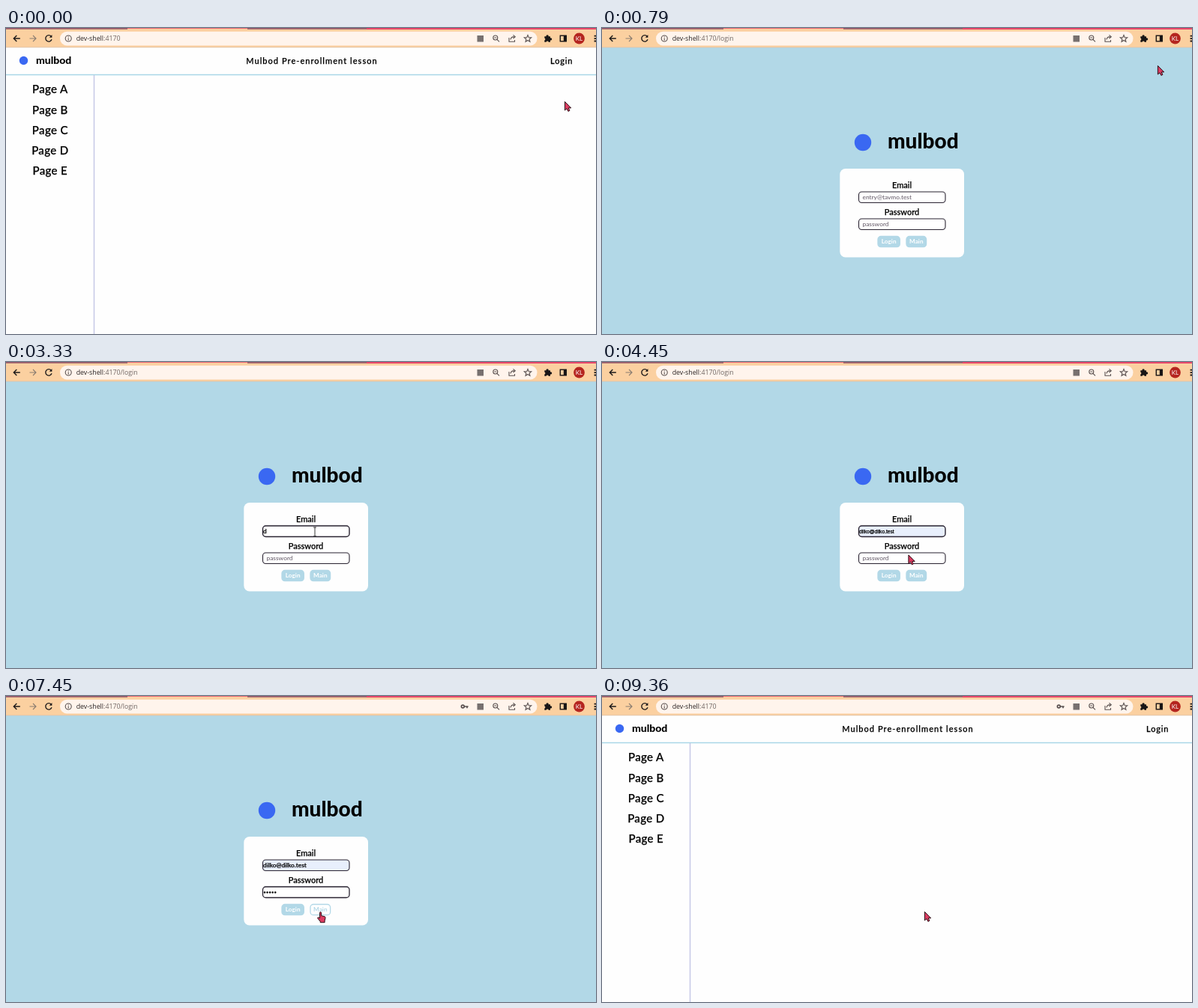
These frames come from a looping animation (787x409 px, 9.42 s). An HTML page:

```html
<!DOCTYPE html>
<html lang="en">
<head>
<meta charset="utf-8">
<title>Login flow</title>
<style>
  html, body { margin: 0; width: 100%; height: 100%; overflow: hidden; background: #fefefe; }
  svg { display: block; width: 100vw; height: 100vh; }
  text { font-family: Lato, "Open Sans", sans-serif; white-space: pre; }
  .medium { font-weight: 500; stroke: #000; stroke-width: .25; }
  .brand { font-weight: 800; }
  .mid { text-anchor: middle; }
  .url { font: 8.8px "Open Sans", "Noto Sans", sans-serif; }
  .icon { fill: none; stroke: #5a5150; stroke-width: 1.1; }
  .hint { font-size: 8.4px; fill: #5f5563; }
  .btn { font-size: 8.2px; font-weight: 700; }
</style>
</head>
<body>
<svg viewBox="0 0 787 409">
  <g id="home">
    <rect y="26" width="787" height="383" fill="#fefefe"/>
    <path d="M0 62.5H787" stroke="#a9d6e6" stroke-width="1.4"/>
    <path d="M117.5 63V409" stroke="#c3c6e6" stroke-width="1.4"/>
    <circle cx="23.5" cy="43.5" r="5.7" fill="#3a68f2"/>
    <text class="brand" x="40" y="47.5" font-size="14">mulbod</text>
    <text class="medium mid" x="408" y="48" font-size="11" letter-spacing="1.05">Mulbod Pre-enrollment lesson</text>
    <text class="medium" x="726" y="47.5" font-size="11" letter-spacing=".85">Login</text>
    <g id="menu"></g>
  </g>

  <g id="login">
    <rect y="26" width="787" height="383" fill="#b2d8e7"/>
    <circle cx="348" cy="153" r="11.2" fill="#3a68f2"/>
    <text class="brand" x="381" y="161" font-size="28">mulbod</text>
    <rect x="317.3" y="188" width="165.7" height="118.5" rx="7.5" fill="#fefefe"/>
    <text class="medium mid" x="400" y="214" font-size="11">Email</text>
    <text class="medium mid" x="400" y="250" font-size="11">Password</text>
    <rect id="mailBox" x="342.5" y="219" width="115.5" height="14.5" rx="4" stroke="#292331"/>
    <rect id="passBox" x="342.5" y="255" width="115.5" height="14.5" rx="4" fill="#fff" stroke="#292331"/>
    <text id="mailHint" class="hint" x="347.5" y="229">entry@tavmo.test</text>
    <text id="passHint" class="hint" x="347.5" y="265">password</text>
    <text id="mail" class="medium" x="343" y="229"></text>
    <g id="dots"></g>
    <g id="buttons"></g>
  </g>

  <g id="toolbar">
    <rect width="787" height="26" fill="#fbd0a0"/>
    <path d="M0 25.8H787" stroke="#dcc3ab" stroke-width=".8"/>
    <path d="M0 0H162V1.8H0ZM322 0H481V1.8H322Z" fill="#94596a"/>
    <path d="M162 0H322V.7H162ZM481 0H787V1.9H481Z" fill="#e6476a"/>
    <rect x="72" y="4.8" width="636.5" height="18.6" rx="9.3" fill="#fff4ec"/>
    <g fill="none" stroke="#1d1a1a" stroke-width="1.4">
      <path d="M18.8 14H10.5M14.3 10L10.3 14L14.3 18"/>
      <path d="M31.5 14H39.8M36 10L40 14L36 18" stroke="#8a7c70" stroke-width="1.1"/>
      <path d="M60.3 11.2A4.2 4.2 0 1 0 61 15.3"/>
      <path d="M61.4 9V12.7H57.7Z" fill="#1d1a1a" stroke="none"/>
    </g>
    <g class="icon">
      <circle cx="83.2" cy="14" r="4"/>
      <path d="M83.2 13.4V16.4M83.2 11.4V12.5"/>
      <circle cx="652.8" cy="13" r="3"/>
      <path d="M655 15.3L658 18.3M651.3 13H654.3"/>
      <path d="M671 13V18.3H678.5V16M673 15.5C673.5 12.6 675.5 11.6 678 11.6M676.5 9.3L679.3 11.7L676.5 14.1"/>
      <path d="M696 9.4L697.3 12.6 700.7 12.8 698.1 15 698.9 18.3 696 16.5 693.1 18.3 693.9 15 691.3 12.8 694.7 12.6Z"/>
    </g>
    <rect x="628.5" y="10" width="8.5" height="8.5" fill="#77706f"/>
    <g id="key" class="icon" stroke-width="1.6">
      <circle cx="609.3" cy="14" r="1.9" stroke-width="1.7"/>
      <path d="M611 14H616.6M615 14V16.3" stroke-width="1.7"/>
    </g>
    <path d="M718.3 11.3H720.6A1.6 1.6 0 1 1 723.6 11.3H726V13.4A1.6 1.6 0 1 1 726 16.4V18.7H723.7A1.6 1.6 0 0 0 720.6 18.7H718.3V16.4A1.6 1.6 0 0 0 718.3 13.4Z" fill="#181515"/>
    <rect x="739.3" y="10.2" width="8" height="7.6" fill="none" stroke="#181515" stroke-width="1.4"/>
    <rect x="743.8" y="10" width="3.6" height="8" fill="#181515"/>
    <circle cx="764.5" cy="14" r="7.4" fill="#b5251f"/>
    <text class="mid" x="764.5" y="17" font-size="8" fill="#fff">KL</text>
    <path d="M784.6 9.8H787V11.6H784.6ZM784.6 13.2H787V15H784.6ZM784.6 16.6H787V18.4H784.6Z" fill="#181515"/>
    <text class="url" x="93.7" y="17.1" fill="#2a2424">dev-shell<tspan id="path" fill="#6f6663"></tspan></text>
  </g>

  <g id="cursor" stroke-linejoin="round">
    <path id="arrow" d="M.4 .4V12L3 9.7 4.9 13.4 6.9 12.4 5.2 8.9H8.7Z" fill="#dc3c61" stroke="#2a1018"/>
    <path id="hand" d="M-1 1.2Q-1 .2 0 .2T1.1 1.2V5.2L5.6 6.3Q6.7 6.7 6.6 8L5.6 12.2V14.2H-.3V12.8L-3.6 8.8Q-4.2 7.6-3 7.3L-1 8.4Z" fill="#dc3c61" stroke="#2a1018"/>
    <path id="beam" d="M-2-6H2M0-6V6M-2 6H2" fill="none" stroke="#222" stroke-width=".9"/>
  </g>
</svg>

<script>
const LOOP = 9420;
const OPEN = 790, CLOSE = 9270;
const MAIL = 'dilko@dilko.test';
const KEYS = [3270, 3700, 3790];
const PREVIEW = 4330, PICK = 4520;
const DOTS = [5760, 5850, 5940, 6030, 6180];
const BLUE = '#b2d8e7';

// Pointer stops: time, x, y
const STOPS = [
  [0, 745, 98], [30, 745, 98], [120, 751, 123], [300, 741, 50], [1360, 741, 50],
  [1640, 450, 315], [1790, 421, 286], [1980, 421, 286], [2030, 420, 238],
  [2330, 420, 238], [2360, 434, 197], [2760, 434, 197], [3030, 412, 227],
  [4270, 412, 227], [4450, 408.5, 257.5], [4520, 408.5, 257.5], [4640, 407, 261],
  [4850, 407, 261], [5450, 402, 263], [6520, 402, 263], [7120, 384, 287],
  [7330, 384, 287], [7450, 419.5, 288.5], [7980, 419.5, 288.5], [8330, 384, 291],
  [8580, 384, 291], [8820, 411, 297], [9060, 434.5, 288], [9270, 434.5, 288],
  [9360, 430, 288]
];

const $ = id => document.getElementById(id);
const show = (el, on) => el.setAttribute('display', on ? 'inline' : 'none');
const set = (el, attrs) => { for (const k in attrs) el.setAttribute(k, attrs[k]); };

function add(parent, tag, attrs, text = '') {
  const el = document.createElementNS('http://www.w3.org/2000/svg', tag);
  set(el, attrs);
  el.textContent = text;
  parent.appendChild(el);
  return el;
}

[...'ABCDE'].forEach((c, i) => add($('menu'), 'text',
  { class: 'medium mid', x: 58.8, y: 87.3 + i * 27.25, 'font-size': 15, 'letter-spacing': .35 }, 'Page ' + c));

const dots = DOTS.map((_, i) => add($('dots'), 'circle', { cx: 345 + i * 3.55, cy: 262.6, r: 1.25 }));

function button(label, x, w) {
  const box = add($('buttons'), 'rect', { x, y: 278.5, width: w, height: 14.2, rx: 4, stroke: BLUE, 'stroke-width': 1.3 });
  const text = add($('buttons'), 'text', { class: 'btn mid', x: x + w / 2, y: 288.4 }, label);
  return {
    hit: (px, py) => px > x - 2.5 && px < x + w + 2.5 && py > 277 && py < 297.5,
    hover(on) {
      box.setAttribute('fill', on ? '#fff' : BLUE);
      text.setAttribute('fill', on ? BLUE : '#fff');
    }
  };
}
const buttons = [button('Login', 368, 29.3), button('Main', 406, 26.6)];

function pointer(t) {
  const i = STOPS.findIndex(s => s[0] > t);
  if (i < 0) return STOPS[STOPS.length - 1].slice(1);
  const [t0, x0, y0] = STOPS[i - 1], [t1, x1, y1] = STOPS[i];
  const u = (t - t0) / (t1 - t0), e = u * u * (3 - 2 * u);
  return [x0 + (x1 - x0) * e, y0 + (y1 - y0) * e];
}

function drawForm(t) {
  const typed = KEYS.filter(k => t >= k).length;
  const filled = t >= PREVIEW;
  $('mail').textContent = filled ? MAIL : MAIL.slice(0, typed);
  const preview = filled && t < PICK;
  $('mail').style.fontFamily = preview ? '"Liberation Sans", Arial, sans-serif' : '';
  set($('mail'), { 'font-size': preview ? 6.67 : 8.3 });
  show($('mailHint'), !typed);
  show($('passHint'), t < DOTS[0]);
  dots.forEach((d, i) => show(d, t >= DOTS[i]));
  set($('mailBox'), {
    fill: filled ? '#e8effc' : '#fff',
    'stroke-width': t >= 3210 && t < 4850 ? 1.4 : 1.1
  });
  set($('passBox'), { 'stroke-width': t >= 5300 ? 1.3 : 1.1 });
}

function drawCursor(t, inForm) {
  const [x, y] = pointer(t);
  let over = !inForm && x > 724 && y > 36 && y < 53;
  buttons.forEach(b => {
    const on = inForm && b.hit(x, y);
    b.hover(on);
    over = over || on;
  });
  const inField = inForm && x > 342 && x < 458 && (y > 219 && y < 234 || y > 255 && y < 270);
  const listOpen = t >= 4270 && t < 4640;
  const beam = inField && !listOpen;
  show($('hand'), over);
  show($('beam'), beam);
  show($('arrow'), !over && !beam);
  set($('cursor'), { transform: `translate(${x} ${y})` });
}

function draw(t) {
  const inForm = t >= OPEN && t < CLOSE;
  show($('home'), !inForm);
  show($('login'), inForm);
  $('path').textContent = ':4170' + (inForm ? '/login' : '');
  show($('key'), t >= DOTS[0]);
  drawForm(t);
  drawCursor(t, inForm);
}

const start = performance.now();
function tick() {
  draw((performance.now() - start) % LOOP);
  requestAnimationFrame(tick);
}
tick();
</script>
</body>
</html>
```
